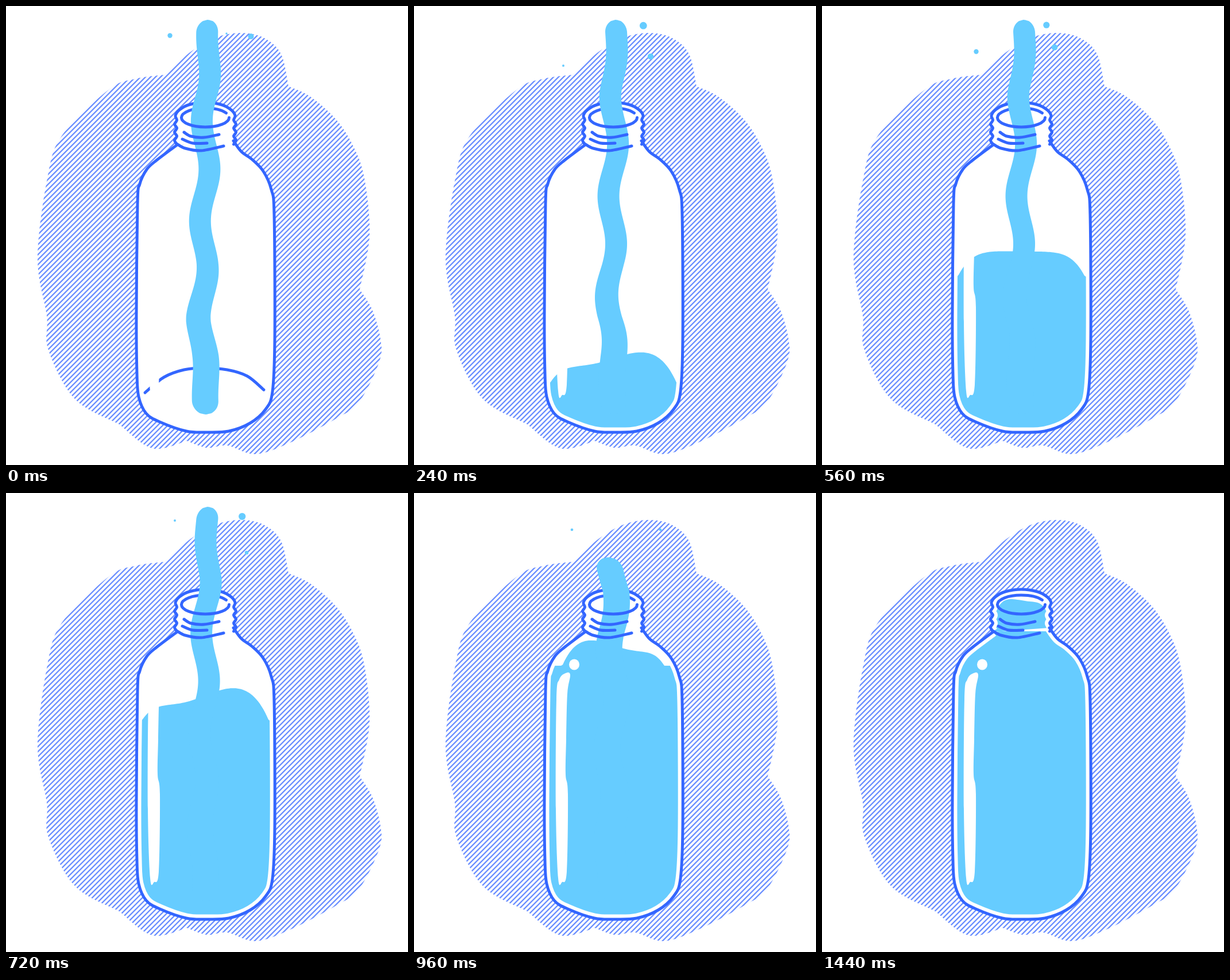
Recreate the animation shown at these times as an HTML page with a canvas. Size 700 by 800 pixels, loop 2360 ms.

```html
<!DOCTYPE html>
<html lang="en">
<head>
<meta charset="utf-8">
<title>Filling bottle</title>
<style>
html, body { margin: 0; width: 100%; height: 100%; overflow: hidden; background: #fff; }
canvas { display: block; }
</style>
</head>
<body>
<canvas id="stage" width="700" height="800"></canvas>
<script>
const ctx = document.getElementById('stage').getContext('2d');
const BLUE = '#3366ff', WATER = '#66ccff', HATCH = '#6a8eff';
const STEP = 80, LAST = 18, LOOP = 2360;
const CENTER = 347, TAU = 2 * Math.PI;

const clamp = (v, lo = 0, hi = 1) => Math.max(lo, Math.min(hi, v));
const mix = (a, b, k) => a + (b - a) * k;
const parse = text => text.trim().split(/\s+/).map(s => s.split(',').map(Number));

// Smooth curve through the points; a repeated point makes a corner.
function curve(points, closed) {
  const p = typeof points === 'string' ? parse(points) : points;
  const n = p.length;
  const at = i => closed ? p[(i + n) % n] : p[clamp(i, 0, n - 1)];
  const path = new Path2D();
  path.moveTo(...p[0]);
  for (let i = 0; i < (closed ? n : n - 1); i++) {
    const [a, b, c, d] = [at(i - 1), at(i), at(i + 1), at(i + 2)];
    if (b[0] === c[0] && b[1] === c[1]) continue;
    path.bezierCurveTo(
      b[0] + (c[0] - a[0]) / 6, b[1] + (c[1] - a[1]) / 6,
      c[0] - (d[0] - b[0]) / 6, c[1] - (d[1] - b[1]) / 6, ...c);
  }
  if (closed) path.closePath();
  return path;
}

function ellipse(x, y, rx, ry, from = 0, to = TAU) {
  const path = new Path2D();
  path.ellipse(x, y, rx, ry, 0, from, to);
  return path;
}

// Half of the neck: the screw thread zigzags up to the rim, then it is mirrored.
function neckOutline() {
  const half = [];
  for (let i = 0; i < 7; i++) half.push([295.5 + (i % 2 ? -2 : 2), 241 - 7 * i]);
  half.push([295, 191], [302, 181], [319, 172]);
  const mirrored = half.map(([x, y]) => [2 * CENTER - x, y]).reverse();
  return curve([...half, [CENTER, 168], ...mirrored]);
}

const blob = curve(`275,120 275,120 320,81 365,55 410,47 450,56 479,84 492,140 492,140
  530,158 575,198 605,245 624,300 633,400 616,494 616,494 638,530 652,580 650,620 615,690
  575,719 497,760 435,781 385,766 350,770 315,758 315,758 255,771 197,729 197,729 120,685
  74,600 71,540 55,440 72,300 98,225 180,145 225,127`, true);
const body = curve(`298,242 262,269 245,285 233,310 229,345 227,540 228,640 231,681 244,710
  268,725 314,741 350,743 388,741 425,727 452,703 464,672 468,580 467,365 462,320 448,288
  428,267 410,254 396,235`);
const neck = neckOutline();
const glass = new Path2D(body);
glass.addPath(neck);
const rimBack = ellipse(CENTER, 194.5, 41.5, 16.5, Math.PI, TAU - .5);
const floorArc = curve('242,674 275,647 310,634 345,631 385,634 420,645 449,669');
const frontLines = [
  ellipse(CENTER, 194.5, 41.5, 16.5, 0, Math.PI),
  ...['310,220 322,227 345,229 371,224', '307,232 325,239 350,239', '297,240 312,248 340,252 379,244']
    .map(s => curve(s))
];
const shineBar = curve(`264,314 272,317 267,350 265,430 264,490 268,525 266,660 258,678 251,671
  247,550 248,360 253,325`, true);
const shineDot = ellipse(279, 299, 9, 9.5);

// The level rises fast, then eases out; the surface sloshes and curls down at the glass.
function drawWater(step) {
  const level = 187 + 2.85 * (LAST - step) ** 1.85;
  const half = mix(43, 111, clamp((level - 215) / 75));
  const tilt = -15 * (half / 111) ** 2 * Math.cos(TAU * (step - 2.3) / 6.3);
  ctx.save();
  ctx.clip(glass);
  ctx.beginPath();
  for (let x = 220; x <= 480; x += 3) {
    const v = clamp((x - CENTER) / half, -1, 1);
    ctx.lineTo(x, level + tilt * Math.sin(Math.PI * v) + .4 * half * Math.abs(v) ** 5);
  }
  ctx.lineTo(480, 800);
  ctx.lineTo(220, 800);
  ctx.fill();
  ctx.strokeStyle = '#fff';
  ctx.lineWidth = 17;
  ctx.lineCap = 'butt';
  ctx.stroke(body);
  ctx.stroke(neck);
  ctx.restore();
}

// A wave runs down the stream; at the end its tail drops into the neck.
function drawStream(step) {
  if (step > 13) return;
  const fall = Math.max(0, step - 10);
  const top = 24 + 22 * fall ** 2, bottom = 712;
  const crest = 112 + 43.5 * step + 18 * fall ** 2;
  const round = u => Math.sqrt(1 - (1 - clamp(u)) ** 2);
  const left = [], right = [];
  for (let y = top; y <= bottom; y += 2) {
    const swing = 7.5 * clamp((y - top) / 130) * clamp((700 - y) / 150);
    const lean = 6 * fall * clamp(1 - (y - top) / 60);
    const x = 352 - .018 * y + Math.max(0, y - 540) * .05 - lean
      + swing * Math.cos(TAU * (y - crest) / 174);
    const width = 38 + 4 * fall + clamp((y - 450) / 20, 0, 8);
    const half = width / 2 * round((y - top) / 22) * round((bottom - y) / 24);
    left.push([x - half, y]);
    right.unshift([x + half, y]);
  }
  ctx.fill(curve([...left, ...right], true));
}

function dot(x, y, r) {
  if (r > 0) ctx.fill(ellipse(x, y, r, r));
}

// Each splash starts every five steps and flies by its age.
const splashes = [
  { start: 4, fly: a => [294 - 8.5 * a, 48 + 3.5 * a * a, 5 * Math.sin(Math.PI * (a + .7) / 5.4)] },
  { start: 0, fly: a => [384 + 1.7 * a * a, 48 - 13 * a + 2.8 * a * a, 6.4 * Math.sin(Math.PI * (a + .7) / 8)] },
  { start: 0, fly: a => [391 + 7 * a, 40 + 16 * a, 5.5 * Math.sin(Math.PI * a / 5)] }
];

function drawDrops(step) {
  if (step < 12) {
    for (const { start, fly } of splashes) {
      const age = (step - start + 5) % 5;
      dot(...fly(age));
      dot(...fly(age + 5));
    }
  } else if (step < 15) {
    const t = step - 12;
    for (const side of [-1, 1]) dot(352 + side * (77 - 22 * t), 64 + 47 * t, 2.3);
  }
}

function drawHatch() {
  ctx.save();
  ctx.clip(blob);
  ctx.strokeStyle = HATCH;
  ctx.lineWidth = 2.3;
  ctx.beginPath();
  for (let y = 0; y < 1500; y += 8.73) {
    ctx.moveTo(0, y);
    ctx.lineTo(700, y - 700);
  }
  ctx.stroke();
  ctx.restore();
}

function draw(step) {
  ctx.fillStyle = '#fff';
  ctx.fillRect(0, 0, 700, 800);
  drawHatch();
  ctx.fill(body);
  ctx.fill(neck);

  ctx.fillStyle = WATER;
  drawWater(step);

  ctx.strokeStyle = BLUE;
  ctx.lineWidth = 5;
  ctx.lineCap = ctx.lineJoin = 'round';
  for (const line of [body, neck, rimBack]) ctx.stroke(line);
  if (step < 2) ctx.stroke(floorArc);

  drawStream(step);
  drawDrops(step);

  ctx.fillStyle = '#fff';
  ctx.fill(shineBar);
  ctx.fill(shineDot);
  for (const line of frontLines) ctx.stroke(line);
}

function tick() {
  draw(Math.min(LAST, Math.floor(performance.now() % LOOP / STEP)));
  requestAnimationFrame(tick);
}
tick();
</script>
</body>
</html>
```
